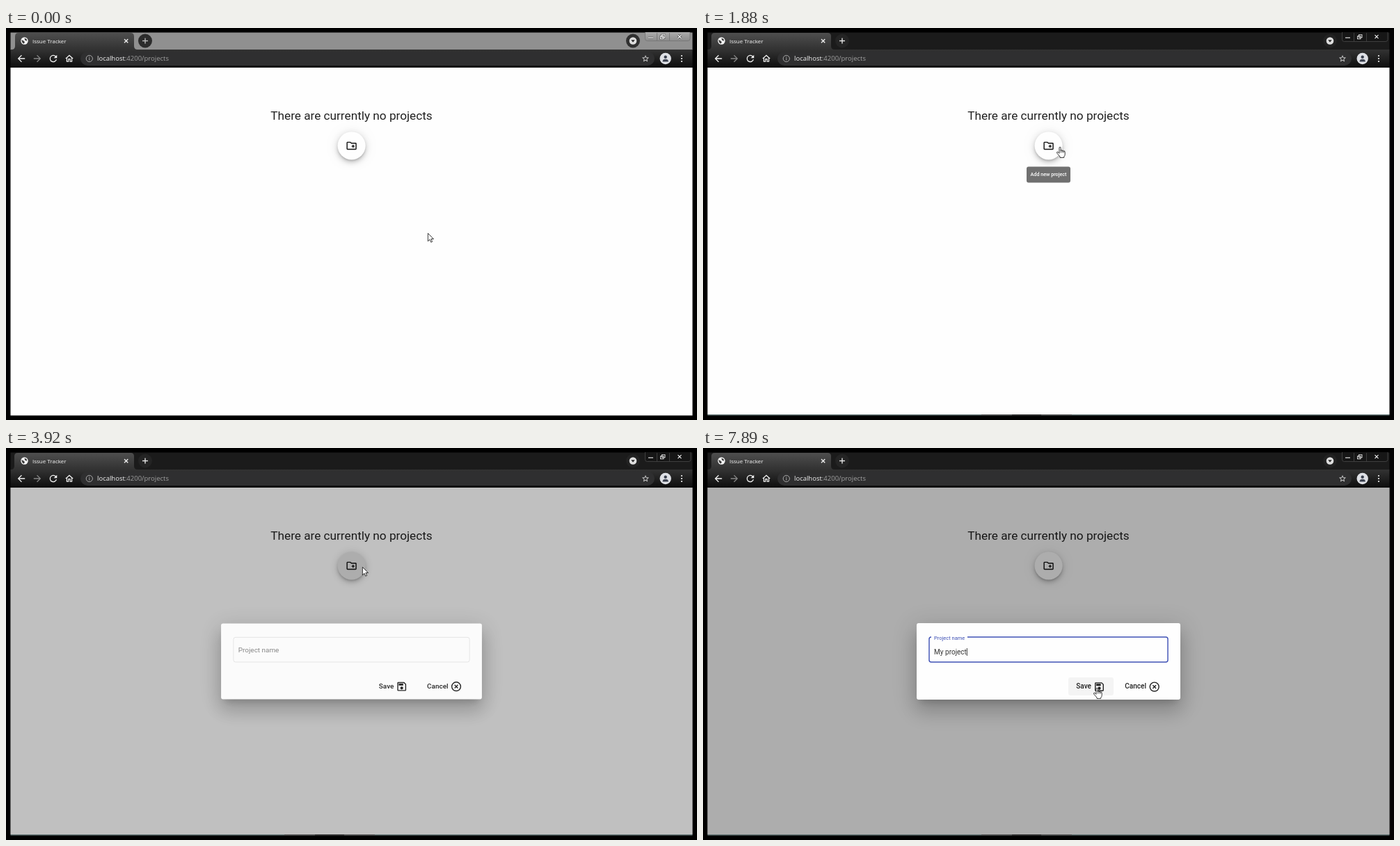
These frames come from a looping animation (993 by 564 pixels, 8 s). An HTML page with a canvas:

```html
<!DOCTYPE html>
<html lang="en">
<head>
<meta charset="utf-8">
<title>Issue Tracker</title>
<style>
html, body { margin: 0; width: 100%; height: 100%; overflow: hidden; background: #000; }
canvas { display: block; }
</style>
</head>
<body>
<canvas id="stage" width="993" height="564"></canvas>
<script>
const W = 993, H = 564, LOOP = 8000;
const S = 0.7174; // screen recording scale
const stage = document.getElementById('stage');
const layer = Object.assign(document.createElement('canvas'), { width: W, height: H });
const screen = stage.getContext('2d');
const overlay = layer.getContext('2d');
let g = screen;

const ICONS = {
  back: 'M20 11H7.83l5.59-5.59L12 4l-8 8 8 8 1.41-1.41L7.83 13H20z',
  reload: 'M17.65 6.35A8 8 0 1019.73 14h-2.08A6 6 0 1112 6c1.66 0 3.14.69 4.22 1.78L13 11h7V4z',
  home: 'M12 5.69l5 4.5V18h-2v-6H9v6H7v-7.81l5-4.5M12 3L2 12h3v8h6v-6h2v6h6v-8h3z',
  star: 'M22 9.24l-7.19-.62L12 2 9.19 8.63 2 9.24l5.46 4.73L5.82 21 12 17.27 18.18 21l-1.63-7.03zM12 15.4l-3.76 2.27 1-4.28-3.32-2.88 4.38-.38L12 6.1l1.71 4.04 4.38.38-3.32 2.88 1 4.28z',
  folder: 'M20 6h-8l-2-2H4c-1.11 0-1.99.89-1.99 2L2 18a2 2 0 002 2h16a2 2 0 002-2V8a2 2 0 00-2-2zm0 12H4V6h5.17l2 2H20v10zm-8-4h2v2h2v-2h2v-2h-2v-2h-2v2h-2z',
  save: 'M17 3H5a2 2 0 00-2 2v14a2 2 0 002 2h14a2 2 0 002-2V7l-4-4zm2 16H5V5h11.17L19 7.83V19zm-7-7a3 3 0 100 6 3 3 0 000-6zM6 6h9v4H6z',
  cancel: 'M14.59 8L12 10.59 9.41 8 8 9.41 10.59 12 8 14.59 9.41 16 12 13.41 14.59 16 16 14.59 13.41 12 16 9.41zM12 2a10 10 0 100 20 10 10 0 000-20zm0 18a8 8 0 110-16 8 8 0 010 16z'
};
for (const name in ICONS) ICONS[name] = new Path2D(ICONS[name]);
const ARROW = new Path2D('M.5 .5V16.5L4.2 13 6.6 18.5 9.2 17.4 6.8 12H11.8Z');
const HAND = new Path2D('M5.5 13V2Q5.5 .5 7 .5T8.5 2V8Q8.5 6.5 10 6.5T11.5 8V9Q11.5 7.3 13 7.3T14.5 9V10Q14.5 8.5 15.8 8.5T17 10.5V15Q17 18 15 19.5V21.5H7V19.5Q5 17.5 1 12.5Q0 10.8 1.3 10.2T4 11.3Z');

const clamp = v => Math.max(0, Math.min(1, v));
const lerp = (a, b, p) => a + (b - a) * p;
const smooth = p => p * p * (3 - 2 * p);
const gray = v => `rgb(${v},${v},${v})`;
const black = a => `rgba(0,0,0,${a})`;

function bezier(x1, y1, x2, y2) {
  const at = (a, b, s) => 3 * a * s * (1 - s) ** 2 + 3 * b * s * s * (1 - s) + s ** 3;
  return p => {
    p = clamp(p);
    if (p === 0 || p === 1) return p;
    let lo = 0, hi = 1;
    for (let i = 0; i < 24; i++) {
      const mid = (lo + hi) / 2;
      if (at(x1, x2, mid) < p) lo = mid; else hi = mid;
    }
    return at(y1, y2, lo);
  };
}
const decelerate = bezier(0, 0, 0.2, 1);
const swift = bezier(0.25, 0.8, 0.25, 1);

function rect(x, y, w, h, fill, r = 0) {
  g.beginPath();
  g.roundRect(x, y, w, h, r);
  g.fillStyle = fill;
  g.fill();
}
function circle(x, y, r, fill) {
  g.beginPath();
  g.arc(x, y, r, 0, 7);
  g.fillStyle = fill;
  g.fill();
}
function line(points, stroke, width) {
  g.beginPath();
  points.forEach(p => g.lineTo(...p));
  g.strokeStyle = stroke;
  g.lineWidth = width;
  g.stroke();
}
function text(str, x, y, font, fill, align = 'left') {
  g.font = font;
  g.fillStyle = fill;
  g.textAlign = align;
  g.fillText(str, x, y);
}
const roboto = (size, weight = 400) => `${weight} ${size}px Roboto, sans-serif`;
const openSans = size => `${size}px "Open Sans", sans-serif`;

function icon(name, x, y, scale, fill, flip = 1) {
  g.save();
  g.translate(x, y);
  g.scale(scale * flip, scale);
  g.translate(-12, -12);
  g.fillStyle = fill;
  g.fill(ICONS[name], 'evenodd');
  g.restore();
}
function gradient(y0, y1, a, b) {
  const fill = g.createLinearGradient(0, y0, 0, y1);
  fill.addColorStop(0, gray(a));
  fill.addColorStop(1, gray(b));
  return fill;
}

// Each shadow is [offset, blur, spread, alpha]; the caster is kept off stage.
function elevate(x, y, w, h, r, shadows, scale = 1) {
  const far = 3000;
  for (const [dy, blur, spread, alpha] of shadows) {
    const s = spread * S;
    g.save();
    g.shadowColor = black(alpha);
    g.shadowBlur = blur * S * scale;
    g.shadowOffsetX = far * scale;
    g.shadowOffsetY = dy * S * scale;
    rect(x - s - far, y - s, w + 2 * s, h + 2 * s, '#000', Math.max(0, r + s));
    g.restore();
  }
}
const FAB_SHADOW = [[3, 5, -1, 0.2], [6, 10, 0, 0.14], [1, 18, 0, 0.12]];
const DIALOG_SHADOW = [[11, 15, -7, 0.2], [24, 38, 3, 0.14], [9, 46, 8, 0.12]];

function drawWindowButtons(active) {
  const right = active ? 984 : 983, bottom = active ? 19 : 18;
  g.beginPath();
  g.roundRect(918.5, 5.5, right - 918.5, bottom - 5, [0, 0, 3, 3]);
  g.fillStyle = active ? '#161616' : gradient(6, 18, 172, 142);
  g.fill();
  g.strokeStyle = active ? '#4a4a4a' : '#737373';
  g.lineWidth = 0.8;
  g.stroke();
  for (const x of [935.5, 953.5]) line([[x, 7], [x, bottom]], g.strokeStyle, 0.8);
  rect(918, 0, 70, 6, '#000');

  const edge = active ? '#000' : '#444', face = active ? '#e0e0e0' : '#f4f4f4';
  for (const [color, width] of [[edge, 2.6], [face, 1.3]]) {
    line([[923, 14], [930, 14]], color, width);
    g.lineWidth = width * 0.8;
    g.strokeRect(942.5, 9.7, 4.5, 4);
    g.strokeRect(940.5, 11.7, 4.5, 4);
    line([[965.5, 10], [970.5, 15]], color, width);
    line([[970.5, 10], [965.5, 15]], color, width);
  }
}

function drawBrowser(active) {
  rect(0, 0, W, H, '#000');
  rect(6.5, 6.5, 980, 25, active ? '#1b1b1b' : gray(144));

  // tab
  const left = active ? 12 : 13;
  g.beginPath();
  g.moveTo(left - 5, 31);
  g.quadraticCurveTo(left, 31, left, 26);
  g.lineTo(left, 12);
  g.quadraticCurveTo(left, 7, left + 5, 7);
  g.lineTo(179, 7);
  g.quadraticCurveTo(184, 7, 184, 12);
  g.lineTo(184, 26);
  g.quadraticCurveTo(184, 31, 189, 31);
  g.fillStyle = gradient(7, 31, 78, 50);
  g.fill();
  circle(26.5, 18.5, 5.2, '#f4f4f4');
  g.beginPath();
  g.moveTo(22.5, 17);
  g.lineTo(25.5, 18.5);
  g.lineTo(27, 20.5);
  g.lineTo(25.5, 22.6);
  g.quadraticCurveTo(22.5, 21, 22.5, 17);
  g.moveTo(26.5, 14.5);
  g.lineTo(29.8, 16);
  g.lineTo(30, 18.7);
  g.lineTo(27.2, 17.6);
  g.fillStyle = '#3d3d3d';
  g.fill();
  text('Issue Tracker', 38, 21.6, openSans(8), '#f8f8f8');
  line([[170, 16], [175.3, 21.3]], '#f0f0f0', 1.3);
  line([[175.3, 16], [170, 21.3]], '#f0f0f0', 1.3);

  // strip buttons
  circle(200, 18.5, 10, active ? '#242424' : '#2c2c2c');
  const plus = active ? '#f0f0f0' : '#c4c4c4';
  line([[196, 18.5], [204, 18.5]], plus, 1.3);
  line([[200, 14.5], [200, 22.5]], plus, 1.3);
  circle(901, 18.5, 10, active ? '#222' : '#303030');
  circle(901, 18.5, 5.3, '#dedede');
  g.beginPath();
  g.moveTo(898.3, 17.3);
  g.lineTo(903.7, 17.3);
  g.lineTo(901, 20.5);
  g.fillStyle = '#222';
  g.fill();
  drawWindowButtons(active);

  // toolbar
  rect(6.5, 31, 980, 26, gradient(31, 57, 51, 13));
  icon('back', 22, 44, 0.65, '#f4f4f4');
  icon('back', 45, 44, 0.65, '#858585', -1);
  icon('reload', 68, 44, 0.66, '#f4f4f4');
  icon('home', 91, 44, 0.6, '#f4f4f4');
  rect(107, 34, 825, 20, '#2f2f30', 10);
  g.beginPath();
  g.arc(119.8, 44, 4.6, 0, 7);
  g.strokeStyle = '#a8a8a8';
  g.lineWidth = 1;
  g.stroke();
  rect(119.3, 43.3, 1, 3.2, '#a8a8a8');
  rect(119.3, 41.3, 1, 1.1, '#a8a8a8');
  text('localhost', 131, 47.3, openSans(9.5), '#f2f2f2');
  text(':4200/projects', 131 + g.measureText('localhost').width, 47.3, openSans(9.5), '#a0a0a0');
  icon('star', 919, 44, 0.5, '#d8d8d8');
  circle(947.7, 44, 8.2, '#dfe1e6');
  circle(947.7, 41.7, 2.2, '#3c4250');
  rect(943.6, 45, 8.2, 3.6, '#3c4250', [3.5, 3.5, 0.5, 0.5]);
  for (const y of [40, 44, 48]) circle(971, y, 1.1, '#f4f4f4');
}

function drawFab(ripple) {
  const cx = 496.6, cy = 169.4, r = 20.1;
  elevate(cx - r, cy - r, 2 * r, 2 * r, r, FAB_SHADOW);
  circle(cx, cy, r, '#fefefe');
  if (ripple > 0 && ripple < 625) {
    g.save();
    g.beginPath();
    g.arc(cx, cy, r, 0, 7);
    g.clip();
    circle(513, 174, 45 * decelerate(ripple / 225), black(0.1 * (1 - decelerate((ripple - 225) / 400))));
    g.restore();
  }
  icon('folder', cx, cy, S, '#111');
}

function drawTooltip(t, a) {
  const grow = decelerate((t - 1660) / 220);
  const alpha = grow * clamp(1 - a / 75);
  if (!alpha) return;
  g.save();
  g.globalAlpha = alpha;
  g.translate(496.5, 211);
  const scale = grow < 0.5 ? grow * 1.98 : lerp(0.99, 1, grow * 2 - 1);
  g.scale(scale, scale);
  rect(-31.5, -11.5, 63, 23, 'rgba(97,97,97,.9)', 2.9);
  text('Add new project', 0, 2.3, roboto(7.17, 500), '#fff', 'center');
  g.restore();
}

const KEYS = [5150, 5480, 5580, 5820, 5930, 6040, 6150, 6250, 6420, 6610];
const FOCUS = 4000;

function caretOn(t) {
  const last = KEYS.filter(k => k <= t).pop() || FOCUS;
  return Math.floor((t - last) / 497) % 2 === 0;
}

function drawField(t) {
  const x = 325, y = 272, w = 343, h = 36, r = 3;
  const focused = t >= FOCUS;
  const float = swift((t - FOCUS) / 400);
  g.beginPath();
  g.moveTo(lerp(328, 380, float), y);
  g.arcTo(x + w, y, x + w, y + h, r);
  g.arcTo(x + w, y + h, x, y + h, r);
  g.arcTo(x, y + h, x, y, r);
  g.arcTo(x, y, x + w, y, r);
  g.lineTo(328, y);
  g.strokeStyle = focused ? '#3f51b5' : black(0.12);
  g.lineWidth = focused ? 1.43 : 0.8;
  g.stroke();
  text('Project name', 332, lerp(293.4, 275.6, float), roboto(lerp(10.04, 7.53, float)),
    focused ? '#3f51b5' : black(0.48));
  if (!focused) return;
  const typed = 'My project'.slice(0, KEYS.filter(k => k <= t).length);
  text(typed, 332, 296.6, roboto(10.04), black(0.8));
  if (caretOn(t)) rect(332 + g.measureText(typed).width, 288, 0.8, 11, '#111');
}

function drawDialog(t, a, overSave) {
  const p = decelerate(a / 150);
  if (!p) return;
  const scale = lerp(0.7, 1, p);
  g = overlay;
  g.clearRect(0, 0, W, H);
  g.save();
  g.translate(496.5, 307);
  g.scale(scale, scale);
  g.translate(-496.5, -307);
  elevate(307, 252, 379, 110, 2.9, DIALOG_SHADOW, scale);
  rect(307, 252, 379, 110, '#fefefe', 2.9);
  drawField(t);
  if (overSave) rect(525, 330, 65, 26, black(0.04), 2.9);
  text('Save', 536.3, 346.1, roboto(10.04, 500), black(0.87));
  icon('save', 569.5, 343.6, S, '#222');
  text('Cancel', 606.3, 346.1, roboto(10.04, 500), black(0.87));
  icon('cancel', 648.7, 343.6, S, '#222');
  g.restore();
  g = screen;
  g.globalAlpha = p;
  g.drawImage(layer, 0, 0);
  g.globalAlpha = 1;
}

// Pointer moves: [start, end, x, y]
const MOVES = [[20, 30, 606, 294], [750, 1535, 519, 179], [1535, 1560, 512, 171],
  [4060, 4470, 492, 215], [7140, 7880, 565, 345]];

function pointerAt(t) {
  let x = 606, y = 295;
  for (const [from, to, tx, ty] of MOVES) {
    const p = smooth(clamp((t - from) / (to - from)));
    x = lerp(x, tx, p);
    y = lerp(y, ty, p);
  }
  return { x, y };
}

function drawPointer({ x, y }, hand) {
  g.save();
  g.translate(x - (hand ? 4 : 0), y);
  g.scale(S, S);
  g.fillStyle = '#fff';
  g.strokeStyle = '#111';
  g.lineWidth = 1.15;
  g.lineJoin = 'round';
  const shape = hand ? HAND : ARROW;
  g.fill(shape);
  g.stroke(shape);
  if (hand) {
    for (const fx of [8.5, 11.5, 14.5]) line([[fx, 8.5], [fx, 12]], '#111', 0.9);
  }
  g.restore();
}

// The dialog's own clock, which runs fast while it opens.
function dialogClock(t) {
  const tick = Math.floor(t / 40) * 40;
  return tick < 3880 ? 0 : tick < 3920 ? 32 : 112 + tick - 3920;
}

function draw(t) {
  const active = t >= 20;
  const a = dialogClock(t);
  const pointer = pointerAt(t);
  const overFab = !a && Math.hypot(pointer.x - 496.6, pointer.y - 169.4) < 20.5;
  const overSave = a > 0 && pointer.x > 525 && pointer.x < 590 && pointer.y > 330;

  drawBrowser(active);
  rect(6.5, 57, 980, active ? 499 : 500.5, '#fefefe');
  text('There are currently no projects', 496.5, 132, roboto(17.2), black(0.87), 'center');
  drawFab(a ? a + 53 : t - 3795);
  drawTooltip(t, a);
  rect(6.5, 57, 980, active ? 499 : 500.5, black(0.32 * swift(a / 400)));
  drawDialog(t, a, overSave);
  if (active) {
    rect(6.5, 556, 980, 1.4, '#5d6f6f');
    rect(400, 556, 130, 1.4, '#484848');
    rect(444, 556, 42, 1.4, '#222');
  }
  drawPointer(pointer, overFab || overSave);
}

const start = performance.now();
function frame() {
  draw((performance.now() - start) % LOOP);
  requestAnimationFrame(frame);
}
frame();
</script>
</body>
</html>
```
